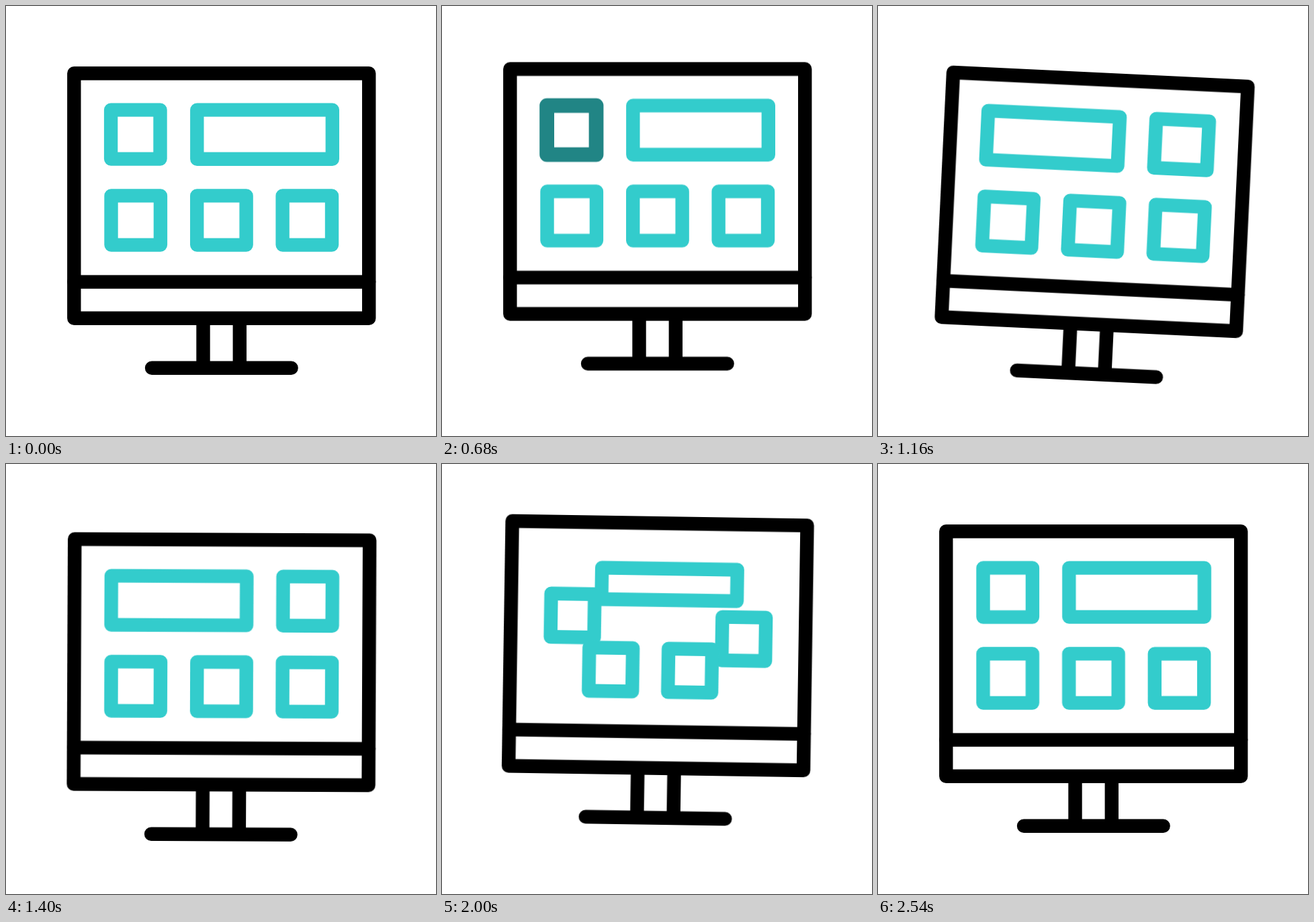
An HTML page for the animation above (3.32 s loop, 640 px wide and 640 px high).

```html
<!DOCTYPE html>
<html lang="en">
<head>
<meta charset="utf-8">
<title>Screen layout</title>
<style>
  html, body { margin: 0; width: 100%; height: 100%; overflow: hidden; background: #fff; }
  svg { display: block; width: 100%; height: 100%; }

  svg * {
    --smooth: cubic-bezier(.333, 0, .667, 1);
    animation: 3320ms var(--smooth) infinite;
  }
  .bob { animation-name: bob; }
  .tilt { transform-origin: 320px 320px; animation-name: tilt; }

  .case { fill: none; stroke: #000; stroke-width: 20.4; stroke-linejoin: round; }
  .cap { stroke-linecap: round; }

  .tile {
    fill: none; stroke: #3cc; stroke-width: 20.4; stroke-linejoin: round;
    x: var(--x); y: var(--y); width: 73.4px; height: 73.2px;
    animation-name: dip, move;
  }
  .late { animation-name: dip, move-late; }
  .grow { animation-name: grow, move, flash; }
  .shrink { animation-name: shrink, move; }

  @keyframes bob {
    0%, 7.83% { transform: translateY(0); animation-timing-function: cubic-bezier(.7, 0, .67, 1); }
    27.71% { transform: translateY(-13px); animation-timing-function: cubic-bezier(.3, 0, .15, 1); }
    40.96%, 43.37% { transform: translateY(12.4px); animation-timing-function: cubic-bezier(.5, 0, .67, 1); }
    58.13% { transform: translateY(-13px); }
    71.69%, 100% { transform: translateY(0); }
  }
  @keyframes tilt {
    0%, 23.49% { transform: rotate(0deg); }
    33.19% { transform: rotate(2.95deg); }
    44.16%, 52.41% { transform: rotate(0deg); }
    60.84% { transform: rotate(.88deg); }
    74.7%, 100% { transform: rotate(0deg); }
  }

  /* The top tiles trade widths, then all tiles step clockwise. */
  @keyframes grow {
    0%, 20.48% { width: 73.4px; y: 154.6px; height: 73px; }
    37.02%, 46.39% { width: 201.5px; y: 154.6px; height: 73px; }
    58.43% { width: 201.5px; y: 168.6px; height: 45px; }
    70.48%, 100% { width: 201.5px; y: 154.6px; height: 73px; }
  }
  @keyframes shrink {
    0%, 20.48% { x: 284.3px; y: 154.6px; width: 201.5px; height: 73.2px; }
    37.02%, 46.39% { x: 411.8px; y: 154.6px; width: 73.4px; height: 73.2px; }
    58.43% { x: 416.3px; y: 159.1px; width: 64.4px; height: 64.2px; }
    72.29%, 100% { x: 411.8px; y: 154.6px; width: 73.4px; height: 73.2px; }
  }
  @keyframes dip {
    0%, 46.39%, 72.29%, 100% { x: var(--x); y: var(--y); width: 73.4px; height: 73.2px; }
    58.43% { x: calc(var(--x) + 4.5px); y: calc(var(--y) + 4.5px); width: 64.4px; height: 64.2px; }
  }
  @keyframes move {
    0%, 46.48% { transform: translate(0, 0); }
    70.18%, 100% { transform: translate(var(--dx, 0px), var(--dy, 0px)); }
  }
  @keyframes move-late {
    0%, 48.04% { transform: translate(0, 0); }
    71.08%, 100% { transform: translate(var(--dx, 0px), var(--dy, 0px)); }
  }
  @keyframes flash {
    0%, 16.87%, 24.1%, 100% { stroke: #3cc; stroke-width: 20.4; }
    20.48% { stroke: #218585; stroke-width: 21.8; }
  }
</style>
</head>
<body>
<svg viewBox="0 0 640 640">
  <g class="bob">
    <g class="tilt">
      <path class="case" d="M293.5 465V539M347.8 465V539"/>
      <path class="case cap" d="M217 538.8H424.6M101.3 410.6H540.2"/>
      <rect class="case" x="101.3" y="100.2" width="438.9" height="364.6"/>
      <rect class="tile grow" style="--x:156.1px; --y:154.6px; --dx:128.2px"/>
      <rect class="tile shrink" style="--x:284.3px; --y:154.6px; --dy:127.8px"/>
      <rect class="tile" style="--x:156.5px; --y:282.4px; --dy:-127.8px"/>
      <rect class="tile late" style="--x:284.2px; --y:282.4px; --dx:-127.7px"/>
      <rect class="tile" style="--x:411.6px; --y:282.4px; --dx:-127.4px"/>
    </g>
  </g>
</svg>
</body>
</html>
```
